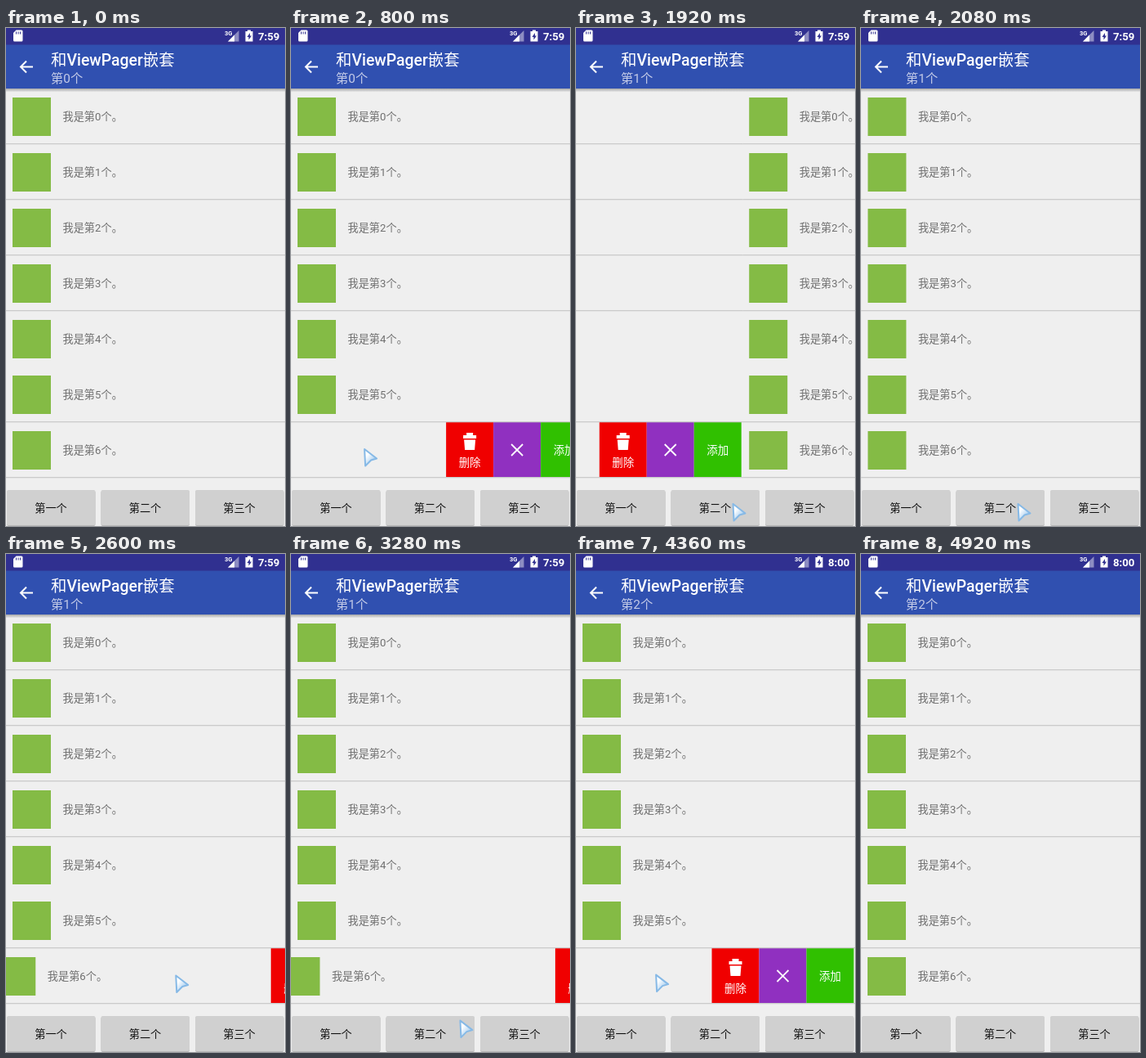
These frames come from a looping animation (342x609 px, 5000 ms). An HTML page:

```html
<!DOCTYPE html>
<html lang="zh">
<head>
<meta charset="utf-8">
<title>ViewPager</title>
<style>
  html, body { margin: 0; width: 100%; height: 100%; overflow: hidden; background: #efefef; }
  svg { display: block; width: 100%; height: 100%; }
  text { font-family: Roboto, "Noto Sans CJK SC", "Noto Sans CJK", sans-serif; }
  .label { font-size: 13.2px; fill: #707070; }
  .menu { font-size: 13.4px; fill: #fff; text-anchor: middle; }
  .button { font-size: 13.2px; fill: #111; text-anchor: middle; }
</style>
</head>
<body>
<svg id="stage" viewBox="0 0 342 609"></svg>
<script>
const WIDTH = 342, LOOP = 5000, TICK = 40, ROW = 68, LIST_TOP = 74;
const SWIPED = 6, MENU_CELL = 58, OPEN = -177;

const rowContent = i => `
  <rect x="8" y="11" width="47" height="47" fill="#84bb45"/>
  <text class="label" x="69.500" y="39">我是第${i}个。</text>`;

const menuCell = (i, color, content) => `
  <g transform="translate(${i * MENU_CELL} 0)">
    <rect width="${MENU_CELL}" height="67" fill="${color}"/>${content}
  </g>`;

const swipeMenu = `
  <g transform="translate(${WIDTH + 1.5} 8)">
    ${menuCell(0, '#f00000', `
      <path d="M25 13h8v3h4v4H21v-4h4zM22 21.500h14l-1 12.500H23z" fill="#fff"/>
      <text class="menu" x="29" y="54">删除</text>`)}
    ${menuCell(1, '#9030c0', '<path d="M22 27l14 14m0-14l-14 14" stroke="#fff" stroke-width="1.8"/>')}
    ${menuCell(2, '#30c000', '<text class="menu" x="29" y="39">添加</text>')}
  </g>`.replace(' 8)', ' 0)');

function page(id) {
  const rows = Array.from({ length: 7 }, (_, i) => `
    <g transform="translate(0 ${LIST_TOP + i * ROW})">
      ${i === SWIPED ? `<g id="${id}Row">${rowContent(i)}${swipeMenu}</g>` : rowContent(i)}
    </g>`);
  const dividers = [1, 2, 3, 4, 6, 7].map(i =>
    `<rect y="${LIST_TOP - 1 + i * ROW}" width="${WIDTH}" height="1.300" fill="#cbcbcb"/>`);
  return `<g id="${id}">${rows.join('')}${dividers.join('')}</g>`;
}

const button = (i, label) => `
  <g transform="translate(${1 + i * 115.5} 565)">
    <rect y="1" width="108.500" height="43" rx="2" fill="#b8b8b8"/>
    <rect id="button${i}" width="108.500" height="43" rx="2" fill="#d0d0d0"/>
    <text class="button" x="54" y="27">${label}</text>
  </g>`;

document.getElementById('stage').innerHTML = `
  <defs>
    <clipPath id="listClip"><rect y="74" width="342" height="486"/></clipPath>
    <linearGradient id="shade" x2="0" y2="1">
      <stop stop-color="#000" stop-opacity=".3"/><stop offset="1" stop-color="#000" stop-opacity="0"/>
    </linearGradient>
    <linearGradient id="arrowFill" x2=".9" y2="1">
      <stop offset=".3" stop-color="#fff"/><stop offset="1" stop-color="#7fb8ea"/>
    </linearGradient>
  </defs>
  <rect width="342" height="609" fill="#efefef"/>
  <g clip-path="url(#listClip)">${page('current')}${page('next')}</g>

  <rect y="74" width="342" height="4.500" fill="url(#shade)"/>
  <rect width="342" height="74" fill="#3050b0"/>
  <rect width="342" height="20.500" fill="#303090"/>
  <path d="M12.500 2.500H19q1.500 0 1.500 1.500v11q0 1.500-1.500 1.500h-8.500q-1.500 0-1.500-1.500V6z" fill="#fff"/>
  <path d="M12.500 4.500v3m2.500-3v3m2.500-3v3" stroke="#303090"/>
  <text x="268" y="9" font-size="7.500" font-weight="700" fill="#fff">3G</text>
  <path d="M285.500 3v13.500H272z" fill="#8d8dc2"/>
  <path d="M280 8.500v8h-8z" fill="#fff"/>
  <path d="M296 2.500h4V4h2.500v12.500h-9V4H296z" fill="#fff"/>
  <path d="M299 6l-3.500 5h2v3.500l3.500-5h-2z" fill="#303090"/>
  <text id="clock" x="309" y="14.500" font-size="13.200" font-weight="600" fill="#fff"></text>

  <path d="M33 47.500H18.500M25 40.500l-7 7 7 7" fill="none" stroke="#fff" stroke-width="2"/>
  <text x="55" y="45.500" font-size="19.400" fill="#fff">和<tspan font-weight="500">ViewPager</tspan>嵌套</text>
  <text id="subtitle" x="55" y="67" font-size="15.300" fill="#c4cbe8"></text>

  ${['第一个', '第二个', '第三个'].map((label, i) => button(i, label)).join('')}

  <path id="cursor" d="M1.500 1L16.500 12.500 9.500 14.500 2.500 21.500Z"
    fill="url(#arrowFill)" stroke="#86b9e6" stroke-width="2" stroke-linejoin="round"/>`;

// Each glide starts where the one before it ended.
const cursorStart = { x: 299, y: 546 };
const glides = [
  { at: 40, lasts: 480, x: 249, y: 510 },
  { at: 600, lasts: 285, x: 45, y: 515 },
  { at: 1120, lasts: 600, x: 191, y: 581 },
  { at: 2100, lasts: 360, x: 232, y: 512 },
  { at: 2545, lasts: 235, x: 50, y: 530 },
  { at: 2900, lasts: 640, x: 294, y: 592 },
  { at: 3600, lasts: 460, x: 285, y: 512 },
  { at: 4160, lasts: 280, x: 50, y: 514 },
  { at: 4740, lasts: 180, x: 230, y: 518 }
];
// While the finger is down the row follows the cursor, measured from the grab point.
const swipes = [
  { down: 600, up: 1100, grab: 242 },
  { down: 2545, up: 3540, grab: 225.5 },
  { down: 4160, up: 4600, grab: 278 },
  { down: 4740, up: 4920, grab: 229 }
];
const slideStarts = [1895.5, 3569], SLIDE = 250;

const clamp = (v, low, high) => Math.min(high, Math.max(low, v));
const ease = p => { p = clamp(p, 0, 1); return p * p * (3 - 2 * p); };
const el = id => document.getElementById(id);
const move = (id, x, y = 0) => el(id).setAttribute('transform', `translate(${x} ${y})`);

function cursorAt(t) {
  let { x, y } = cursorStart;
  for (const glide of glides) {
    const p = ease((t - glide.at) / glide.lasts);
    x += (glide.x - x) * p;
    y += (glide.y - y) * p;
  }
  return { x, y };
}

function rowOffset(t) {
  const swipe = swipes.findLast(s => s.down <= t);
  const pageChanged = swipe && slideStarts.some(s => s > swipe.down && s + SLIDE <= t);
  if (!swipe || pageChanged) return 0;
  return clamp(cursorAt(Math.min(t, swipe.up)).x - swipe.grab, OPEN, 0);
}

function slideOffset(t) {
  const start = slideStarts.find(s => t > s && t < s + SLIDE);
  return start ? WIDTH * (1 - (t - start) / SLIDE) ** 5 : WIDTH;
}

function draw(t) {
  const offset = slideOffset(t);
  move('next', offset);
  move('current', offset < WIDTH ? offset - WIDTH : 0);
  move('currentRow', rowOffset(t));

  el('subtitle').textContent = `第${slideStarts.filter(s => t > s).length}个`;
  el('clock').textContent = t < 3400 ? '7:59' : '8:00';

  const pressed = ease((t - 3480) / 80) - ease((t - 3840) / 280);
  const grey = Math.round(208 - 17 * pressed);
  el('button2').setAttribute('fill', `rgb(${grey},${grey},${grey})`);

  const { x, y } = cursorAt(t);
  move('cursor', x, y);
  el('cursor').setAttribute('visibility', t >= 40 && t < 4920 ? 'visible' : 'hidden');
}

const origin = performance.now();
function tick() {
  const t = (performance.now() - origin) % LOOP;
  draw(Math.floor(t / TICK) * TICK);
  requestAnimationFrame(tick);
}
tick();
</script>
</body>
</html>
```
